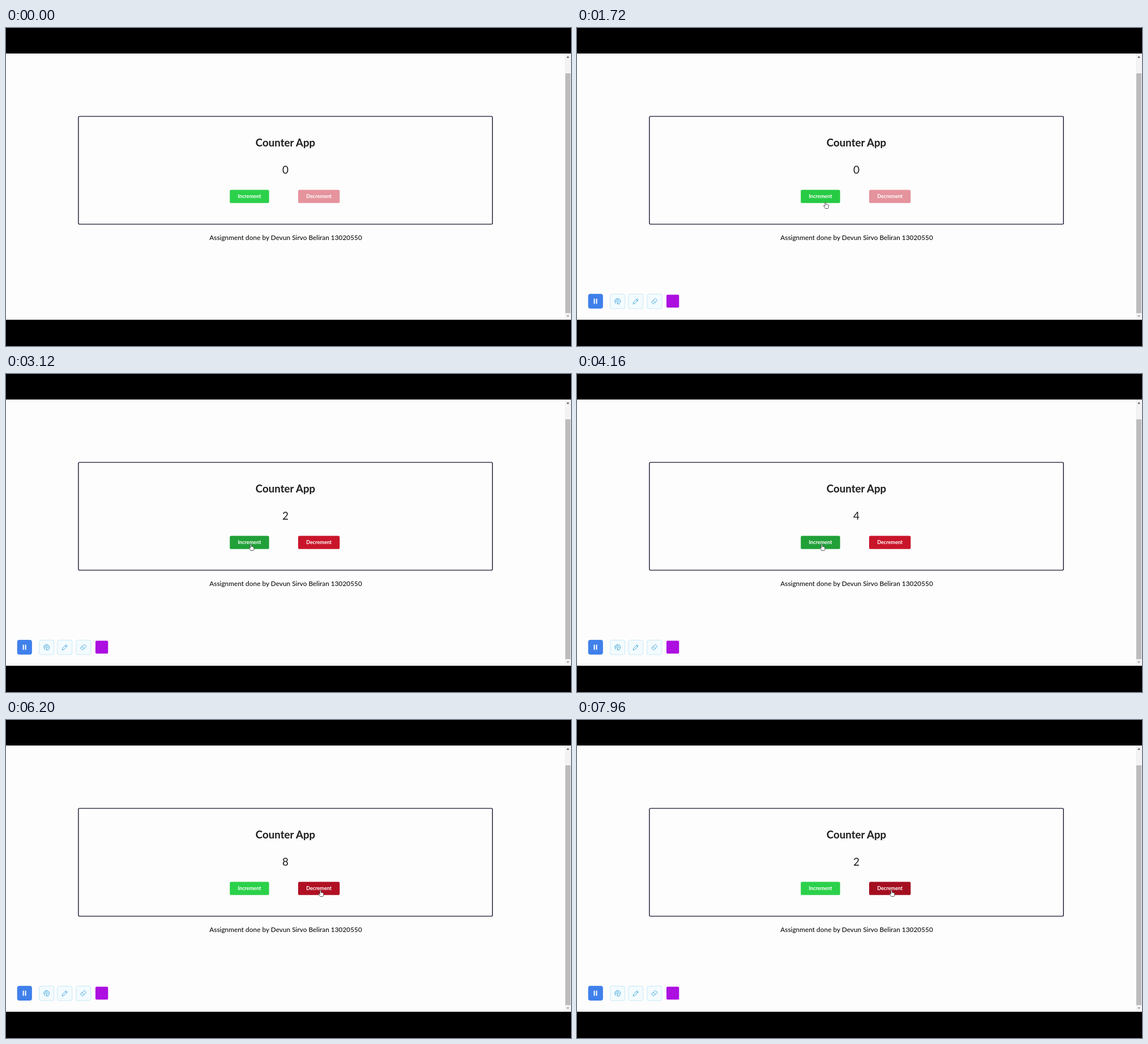
An HTML page that plays this animation: 998 px wide and 561 px high, repeating every 8000 ms.

```html
<!DOCTYPE html>
<html lang="en">
<head>
<meta charset="utf-8">
<title>Counter App</title>
<style>
  html, body { margin: 0; width: 100%; height: 100%; overflow: hidden; background: #000; }
  svg { display: block; width: 100vw; height: 100vh; }
  text { font-family: Lato, "Open Sans", sans-serif; text-anchor: middle; fill: #1c1d1e; }
  .bold { font-weight: 700; }
  .label { font-weight: 700; font-size: 9.1px; fill: #fff; }
  .tool { fill: #f3fbfe; stroke: #c9e9f5; stroke-width: 1; }
  .icon { fill: none; stroke: #42a8da; stroke-width: 1; stroke-linejoin: round; stroke-linecap: round; }
  .cursor { fill: #fff; stroke: #333; stroke-width: .8; stroke-linejoin: round; }
</style>
</head>
<body>
<svg viewBox="0 0 998 561" preserveAspectRatio="none">
  <rect width="998" height="561" fill="#000"/>
  <rect y="45" width="998" height="469.5" fill="#fdfdfd"/>
  <rect y="511" width="987" height="3.5" fill="#f5f5f5"/>

  <g id="scrollbar">
    <rect x="987" y="45" width="11" height="469.5" fill="#f3f3f3"/>
    <rect x="988" y="80" width="9" height="423" fill="#bcbcbc"/>
    <path d="M990 52.5l2.5-3 2.5 3z" fill="#505050"/>
    <path d="M990.2 507l2.3 2.7 2.3-2.7z" fill="#8d8d98"/>
  </g>

  <rect x="127.9" y="155.9" width="731.4" height="190.2" rx="2" fill="none" stroke="#1d1430" stroke-width="1.4"/>
  <text class="bold" x="493.5" y="209" font-size="18.7">Counter App</text>
  <text id="count" x="493.5" y="256.5" font-size="19">0</text>

  <rect id="inc" x="395.3" y="285.5" width="69.4" height="23.3" rx="2.6"/>
  <text class="label" x="430" y="300">Increment</text>
  <g id="decButton">
    <rect id="dec" x="516" y="285.5" width="73.4" height="23.3" rx="2.6"/>
    <text class="label" x="552.7" y="300">Decrement</text>
  </g>
  <text x="494" y="374.2" font-size="11.85" font-weight="500" style="fill:#111">Assignment done by Devun Sirvo Beliran 13020550</text>

  <g id="toolbar">
    <rect x="19.7" y="469" width="26.2" height="26" rx="4" fill="#4080ea"/>
    <path d="M30.6 477.6v8.8M34.6 477.6v8.8" stroke="#fff" stroke-width="2"/>
    <rect class="tool" x="58.7" y="469.5" width="26" height="25.5" rx="3"/>
    <rect class="tool" x="90.8" y="469.5" width="26" height="25.5" rx="3"/>
    <rect class="tool" x="123.8" y="469.5" width="26" height="25.5" rx="3"/>
    <path class="icon" d="M69 486.4a5 5 0 1 1 5.4 0M69.3 483.4a2.7 2.7 0 1 1 4.6-.3M71.5 481.5v5.5l1.5-1 1.3 1.6"/>
    <path class="icon" d="M99.3 486.7l.8-3 6-6.1 2.2 2.2-6 6.1zM104.8 479l2.2 2.2"/>
    <path class="icon" d="M132.2 483l5.3-5.3q.9-.7 1.7 0l2 2q.7.8 0 1.6l-5.2 5.2q-.9.7-1.7 0l-2.1-2q-.7-.8 0-1.5zM134.5 480.7l3.5 3.6"/>
    <rect x="158" y="470.5" width="22.3" height="22.7" rx="2" fill="#ac0fe0"/>
  </g>

  <g id="pointer">
    <path id="arrow" class="cursor" d="M-2-6v10.5l2.4-2.2 1.6 3.6 1.6-.7-1.6-3.5h3.2z"/>
    <path id="hand" class="cursor" d="M-2-5q1.1-1.2 2 0v3.6q1-.6 1.6.1 1-.5 1.5.3 1.2-.3 1.3.9v2.6q0 1.6-1.1 3H-1.4q-.8-1.6-2.6-3.7-.8-1.5.4-1.6.8.1 1.6 1.1z"/>
  </g>
</svg>
<script>
const LOOP = 8000, STEP = 40;
const $ = id => document.getElementById(id);

const upClicks = [2720, 3080, 3600, 4120, 4400, 4640, 4880, 5120];
const downClicks = [6280, 6640, 7000, 7320, 7640, 7920];
const green = { rest: [43, 209, 74], hover: [27, 188, 55], press: [33, 160, 56] };
const red = { rest: [201, 21, 42], hover: [189, 17, 37], press: [164, 15, 32] };

// time, x, y
const path = [
  [880, 575, 520], [1720, 440, 313], [2100, 433.5, 306],
  [5160, 433.5, 306], [5360, 455.5, 307.5], [5800, 556.5, 306], [LOOP, 556.5, 306]
];

const clamp = v => Math.max(0, Math.min(1, v));
const ramp = (t, start, span = 100) => clamp((t - start) / span);
const lerp = (a, b, k) => a + (b - a) * k;
const mix = (a, b, k) => a.map((v, i) => lerp(v, b[i], k));
const passed = (clicks, t) => clicks.filter(c => t >= c).length;
const pressure = (clicks, t) =>
  Math.max(...clicks.map(c => ramp(t, c - 120, 80) * (1 - ramp(t, c + 60, 80))));

function shade(tone, hover, press) {
  const c = mix(mix(tone.rest, tone.hover, hover), tone.press, press);
  return `rgb(${c.map(Math.round)})`;
}

function position(t) {
  const i = path.findIndex(p => t < p[0]);
  if (i < 1) return path[0].slice(1);
  const [a, b] = [path[i - 1], path[i]];
  const k = ramp(t, a[0], b[0] - a[0]);
  const ease = k * k * (3 - 2 * k);
  return [lerp(a[1], b[1], ease), lerp(a[2], b[2], ease)];
}

const show = (id, on) => $(id).setAttribute("display", on ? "inline" : "none");

function draw(t) {
  const [x, y] = position(t);
  const tipX = x - 1, tipY = y - 6;
  const onButton = tipY < 309 && ((tipX > 395 && tipX < 465) || (tipX > 516 && tipX < 590));

  $("count").textContent = passed(upClicks, t) - passed(downClicks, t);
  $("inc").setAttribute("fill",
    shade(green, ramp(t, 1690) * (1 - ramp(t, 5420)), pressure(upClicks, t)));
  $("dec").setAttribute("fill",
    shade(red, ramp(t, 5640), pressure(downClicks, t)));
  $("decButton").setAttribute("opacity", lerp(.45, 1, ramp(t, upClicks[0])));

  show("toolbar", t >= 640);
  show("pointer", t >= path[0][0] && y < 508);
  show("hand", onButton);
  show("arrow", !onButton);
  $("pointer").setAttribute("transform", `translate(${x} ${y})`);
}

const start = performance.now();
function tick() {
  const t = (performance.now() - start) % LOOP;
  draw(Math.floor(t / STEP) * STEP);
  requestAnimationFrame(tick);
}
draw(0);
requestAnimationFrame(tick);
</script>
</body>
</html>
```
